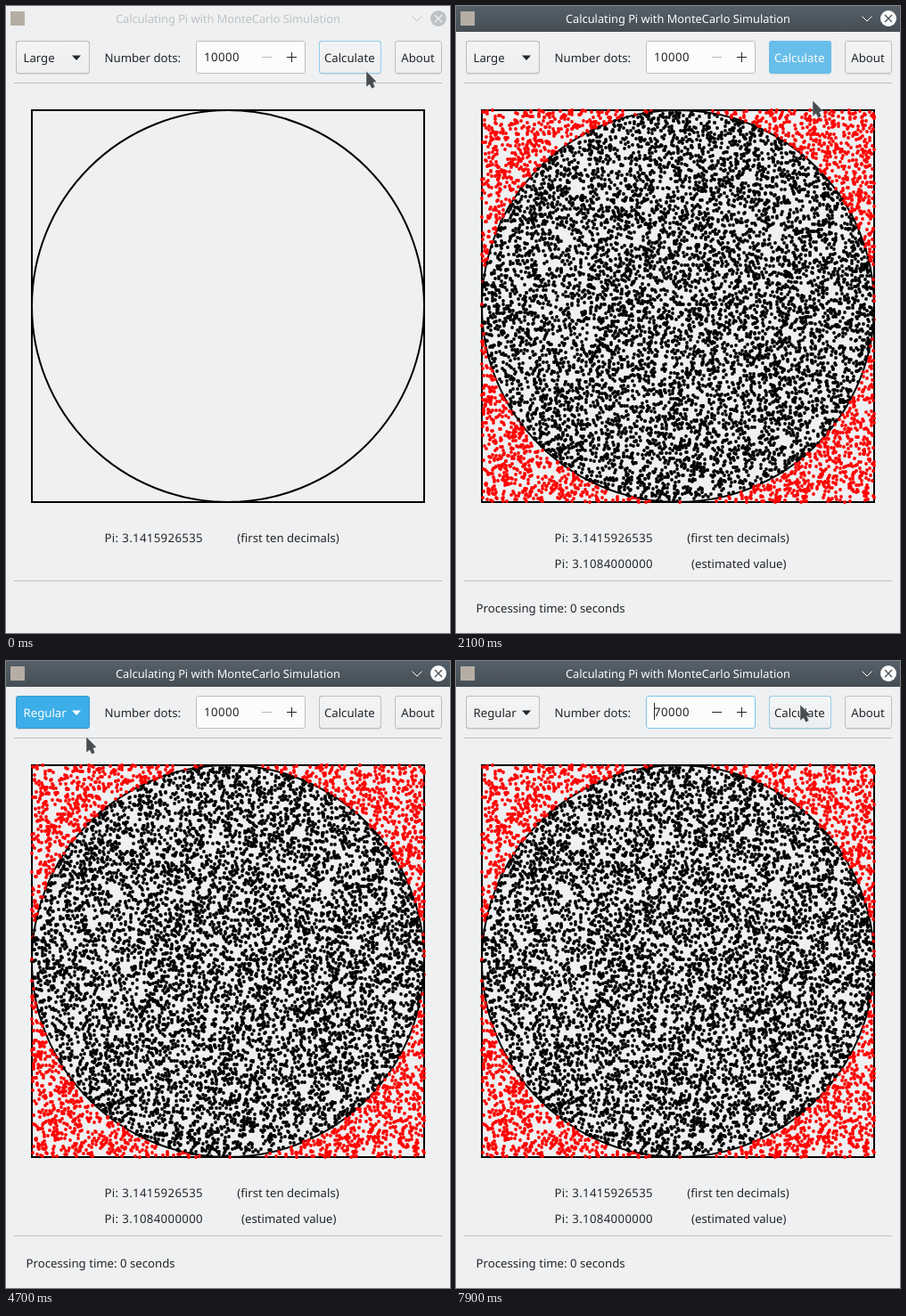
Recreate the animation shown at these times as an HTML page with a canvas. Size 498x704 px, loop 8 s.

```html
<!DOCTYPE html>
<html lang="en">
<head>
<meta charset="utf-8">
<title>Calculating Pi with MonteCarlo Simulation</title>
<style>
html, body { margin: 0; width: 100%; height: 100%; overflow: hidden; background: #eff0f1; }
svg, canvas { position: absolute; left: 0; top: 0; display: block; }
text { font: 13.2px "Noto Sans", "Open Sans", sans-serif; fill: #232629; text-rendering: geometricPrecision; }
.mid { text-anchor: middle; }
.title { font-size: 12.8px; }
.digits { letter-spacing: .45px; }
.pi { letter-spacing: .35px; }
.box { fill: url(#face); stroke: #bcbebf; }
.line { stroke: #bdbfc0; }

/* every change is a hard step; 1.25% = 100 ms */
.a { animation: 8s step-end infinite; }
#active { animation-name: active; }
#calc { animation-name: calc; }
#calcText { animation-name: calcText; }
#combo { animation-name: combo; }
#large { animation-name: large; }
#regular { animation-name: regular; }
#arrow { animation-name: arrow; }
#spin { animation-name: spin; }
#popup { animation-name: popup; }
#mark { animation-name: mark; }
#item1 { animation-name: item1; }
#item2 { animation-name: item2; }
#minus { animation-name: minus; }
#plus { animation-name: plus; }
#tint { animation-name: tint; }
#caret { animation-name: caret; }
#dots, #result { animation-name: shown; }
#pointer { animation-name: pointer; }

@keyframes active { 0% { opacity: 0 } 18.75% { opacity: .55 } 20%, 100% { opacity: 1 } }
@keyframes shown { 0% { opacity: 0 } 26.25%, 100% { opacity: 1 } }
@keyframes calc {
  0% { fill: #3daee900; stroke: #93cee9 }
  18.75% { fill: #c5e2ef; stroke: #93cee9 }
  20% { fill: #93cee9; stroke: #a5c9da }
  26.25% { fill: #68beea; stroke: #68beea }
  27.5% { fill: #3daee9; stroke: #399acc }
  45% { fill: #93cee9; stroke: #93cee9 }
  46.25% { fill: #d0e6f0; stroke: #bcbebf }
  47.5% { fill: #3daee900; stroke: #bcbebf }
  85%, 100% { fill: #3daee900; stroke: #93cee9 }
}
@keyframes calcText { 0% { fill: #232629 } 26.25% { fill: #fcfcfc } 45%, 100% { fill: #232629 } }
@keyframes combo {
  0% { fill: #3daee900; stroke: #bcbebf }
  41.25% { fill: #3daee900; stroke: #93cee9 }
  57.5% { fill: #3daee9; stroke: #399acc }
  70% { fill: #93cee9; stroke: #93cee9 }
  71.25% { fill: #cfe6f0; stroke: #bcbebf }
  72.5%, 100% { fill: #3daee900; stroke: #bcbebf }
}
@keyframes large { 0% { opacity: 1 } 57.5%, 100% { opacity: 0 } }
@keyframes regular {
  0% { opacity: 0; fill: #fcfcfc }
  57.5% { opacity: 1; fill: #fcfcfc }
  70%, 100% { opacity: 1; fill: #232629 }
}
@keyframes arrow { 0% { fill: #232629 } 57.5% { fill: #fcfcfc } 70%, 100% { fill: #232629 } }
@keyframes spin { 0% { stroke: #bcbebf } 70% { stroke: #a5c4d3 } 71.25%, 100% { stroke: #7cc6ea } }
@keyframes popup { 0% { opacity: 0 } 45% { opacity: .6 } 46.25% { opacity: 1 } 57.5%, 100% { opacity: 0 } }
@keyframes mark { 0% { transform: translateY(-31px) } 48.75%, 100% { transform: none } }
@keyframes item1 { 0% { fill: #fcfcfc } 48.75%, 100% { fill: #232629 } }
@keyframes item2 { 0% { fill: #232629 } 48.75%, 100% { fill: #fcfcfc } }
@keyframes minus { 0% { stroke: #b5b8ba } 70% { stroke: #6a6e71 } 71.25%, 100% { stroke: #232629 } }
@keyframes plus { 0% { stroke: #232629 } 65% { stroke: #93cee9 } 78.75% { stroke: #a9d6ea } 82.5%, 100% { stroke: #232629 } }
@keyframes tint { 0% { opacity: 0 } 71.25% { opacity: 1 } 81.25% { opacity: .5 } 82.5%, 100% { opacity: 0 } }
@keyframes caret {
  0% { opacity: 0 } 67.5% { opacity: 1 } 73.75% { opacity: 0 }
  86.25% { opacity: 1 } 93.75% { opacity: 0 } 98.75%, 100% { opacity: 1 }
}
@keyframes pointer {
  0% { transform: translate(404px, 73px) }
  6.25% { transform: translate(404px, 72.5px) }
  8.75% { transform: translate(403px, 70px) }
  10% { transform: translate(401px, 66px) }
  11.25% { transform: translate(398px, 62px) }
  12.5% { transform: translate(395px, 58px) }
  13.75% { transform: translate(393px, 55px) }
  15% { transform: translate(392px, 54px) }
  23.75% { transform: translate(395px, 78px) }
  25% { transform: translate(399px, 103px) }
  26.25% { transform: translate(400px, 106px) }
  36.25% { transform: translate(340px, 102px) }
  37.5% { transform: translate(210px, 94px) }
  38.75% { transform: translate(105px, 82px) }
  40% { transform: translate(65px, 74px) }
  41.25% { transform: translate(58px, 65px) }
  42.5% { transform: translate(55px, 59px) }
  47.5% { transform: translate(57px, 70px) }
  48.75% { transform: translate(58px, 84px) }
  50% { transform: translate(59px, 93px) }
  58.75% { transform: translate(90px, 85px) }
  60% { transform: translate(150px, 80px) }
  61.25% { transform: translate(220px, 73px) }
  62.5% { transform: translate(275px, 64px) }
  63.75% { transform: translate(308px, 57px) }
  65% { transform: translate(324px, 53px) }
  82.5% { transform: translate(327px, 58px) }
  83.75% { transform: translate(337px, 62px) }
  85% { transform: translate(350px, 64px) }
  86.25% { transform: translate(365px, 60px) }
  87.5% { transform: translate(376px, 55px) }
  88.75% { transform: translate(383px, 51px) }
  90%, 100% { transform: translate(386px, 49px) }
}
</style>
</head>
<body>
<svg width="498" height="704" viewBox="0 0 498 704">
  <defs>
    <linearGradient id="face" x2="0" y2="1"><stop stop-color="#f3f4f5"/><stop offset="1" stop-color="#edeeef"/></linearGradient>
    <linearGradient id="bar" x2="0" y2="1"><stop stop-color="#566068"/><stop offset="1" stop-color="#454e55"/></linearGradient>
  </defs>
  <rect width="498" height="704" fill="#eff0f1"/>

  <text class="mid title" x="249" y="19" style="fill:#bfc2c4">Calculating Pi with MonteCarlo Simulation</text>
  <path d="M455.5 11.5l5.5 5.5 5.5-5.5" fill="none" stroke="#bfc2c4"/>
  <circle cx="485" cy="14" r="9" fill="#bfc2c4"/>
  <path d="M481 10l8 8m0-8l-8 8" stroke="#eff0f1" stroke-width="1.2"/>
  <g id="active" class="a">
    <rect width="498" height="29" fill="url(#bar)"/>
    <text class="mid title" x="249" y="19" style="fill:#fcfcfc">Calculating Pi with MonteCarlo Simulation</text>
    <path d="M455.5 11.5l5.5 5.5 5.5-5.5" fill="none" stroke="#fcfcfc"/>
    <circle cx="485" cy="14" r="9" fill="#fcfcfc"/>
    <path d="M481 10l8 8m0-8l-8 8" stroke="#475057" stroke-width="1.2"/>
  </g>
  <rect x="5" y="6" width="16" height="16" fill="#b5aea4"/>

  <g stroke="#d9dbdc"><path d="M13 76.5h79M353 76.5h66M438 76.5h49"/></g>
  <rect class="box" x="11.5" y="39.5" width="82" height="36" rx="2.5"/>
  <rect id="combo" class="a" x="11.5" y="39.5" width="82" height="36" rx="2.5"/>
  <text id="large" class="a" x="19.5" y="63">Large</text>
  <text id="regular" class="a" x="19.5" y="63">Regular</text>
  <path id="arrow" class="a" d="M74 55.5h10l-5 5.5z"/>

  <text x="110.5" y="63">Number dots:</text>
  <rect x="213" y="39" width="123" height="37" rx="3" fill="#fcfcfc"/>
  <path id="tint" class="a" d="M307 40h26q2 0 2 2v31q0 2-2 2h-26z" fill="#d2e9f3"/>
  <rect id="spin" class="a" x="213.5" y="39.5" width="122" height="36" rx="2.5" fill="none"/>
  <text id="count" class="digits" x="222" y="62">10000</text>
  <path id="caret" class="a" d="M222.5 47v19" stroke="#232629"/>
  <path id="minus" class="a" d="M287 57.5h11"/>
  <path id="plus" class="a" d="M315 57.5h11m-5.5-5.5v11"/>

  <rect class="box" x="351.5" y="39.5" width="69" height="36" rx="2.5"/>
  <rect id="calc" class="a" x="351.5" y="39.5" width="69" height="36" rx="2.5"/>
  <text id="calcText" class="a mid" x="385.3" y="63">Calculate</text>
  <rect class="box" x="436.5" y="39.5" width="52" height="36" rx="2.5"/>
  <text class="mid" x="462" y="63">About</text>

  <path class="line" d="M9 86.5h480M9 645.5h480"/>
  <g fill="none" stroke="#000" stroke-width="2">
    <rect x="29" y="117" width="440" height="440"/>
    <circle cx="249" cy="337" r="220"/>
  </g>
  <text class="pi" x="110.5" y="602">Pi: 3.1415926535</text>
  <text class="mid" x="316.5" y="602">(first ten decimals)</text>
  <g id="result" class="a">
    <text class="pi" x="110.5" y="631">Pi: 3.1084000000</text>
    <text class="mid" x="317.3" y="631">(estimated value)</text>
    <text x="22.5" y="681">Processing time: 0 seconds</text>
  </g>
</svg>

<canvas id="dots" class="a" width="498" height="704"></canvas>

<svg width="498" height="704" viewBox="0 0 498 704">
  <g id="popup" class="a">
    <rect x="8.5" y="40" width="89" height="96" rx="4" fill="#000" opacity=".06"/>
    <rect x="9.5" y="40.5" width="86" height="92" rx="2.5" fill="#f4f5f5" stroke="#bcbebf"/>
    <rect id="mark" class="a" x="10" y="71" width="85.5" height="31" fill="#3daee9"/>
    <text id="item1" class="a" x="14.5" y="61">Large</text>
    <text id="item2" class="a" x="14.5" y="92">Regular</text>
    <text x="14.5" y="123">Small</text>
  </g>
  <g id="pointer" class="a">
    <path d="M0 0V18L3.7 15 6.3 19.8 9.8 18 7.8 13 11.8 12Z" fill="#484c4f" stroke="#fcfcfc" stroke-opacity=".6" stroke-width=".7"/>
  </g>
</svg>

<script>
const SIZE = 440, R = SIZE / 2, LEFT = 29, TOP = 117;

let seed = 31415;
function random() {
  seed = (seed + 0x6D2B79F5) | 0;
  let n = Math.imul(seed ^ (seed >>> 15), seed | 1);
  n ^= n + Math.imul(n ^ (n >>> 7), n | 61);
  return ((n ^ (n >>> 14)) >>> 0) / 4294967296;
}

const ctx = document.getElementById('dots').getContext('2d');
for (let i = 0; i < 10000; i++) {
  const x = Math.round(random() * SIZE), y = Math.round(random() * SIZE);
  ctx.fillStyle = Math.hypot(x - R, y - R) <= R ? '#000' : '#f00';
  ctx.beginPath();
  ctx.arc(LEFT + x, TOP + y, 1.9, 0, 2 * Math.PI);
  ctx.fill();
}

// the spin box grows by 10000 at each of these times
const clicks = [5400, 5700, 5900, 6000, 6200, 6300];
const count = document.getElementById('count');
function tick(now) {
  const t = now % 8000;
  const value = String(10000 * (1 + clicks.filter(c => t >= c).length));
  if (count.textContent !== value) count.textContent = value;
  requestAnimationFrame(tick);
}
requestAnimationFrame(tick);
</script>
</body>
</html>
```
